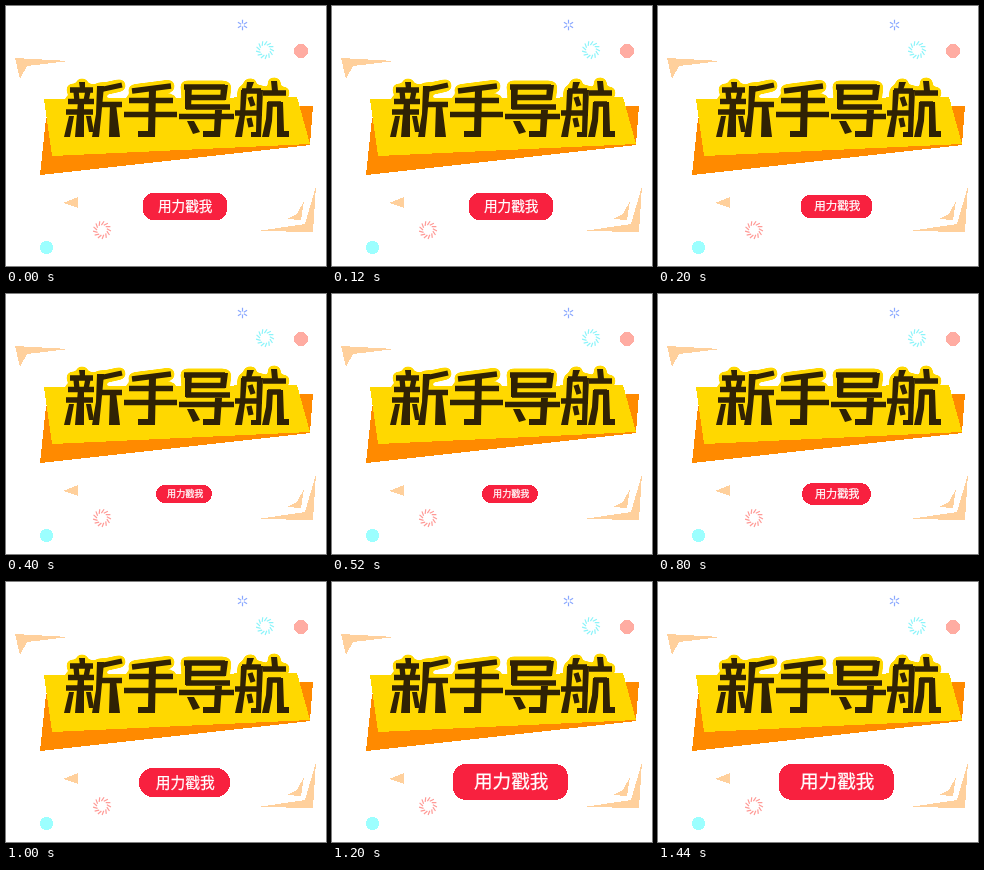
Write an HTML page that moves like this. It is 320 px wide and 260 px high and loops after 1600 ms.

```html
<!DOCTYPE html>
<html lang="zh">
<head>
<meta charset="utf-8">
<title>新手导航</title>
<style>
  html, body { margin: 0; width: 100%; height: 100%; overflow: hidden; background: #fff; }
  svg { display: block; }
  .bar { fill: currentColor; }
  .thin { fill: none; stroke: currentColor; stroke-width: 5.3px; }
  .peach { fill: #ffd09c; }
  .flat { shape-rendering: crispEdges; }
  text {
    font-family: "Noto Sans CJK SC", "Noto Sans CJK", sans-serif; font-weight: 500;
    fill: #fff; stroke: #fff; stroke-width: 0.25px; text-anchor: middle;
  }
</style>
</head>
<body>
<svg width="320" height="260" viewBox="0 0 320 260">
  <defs>
    <!-- Blur and a low threshold give a rounded outline -->
    <filter id="grow" x="-10%" y="-25%" width="120%" height="150%" color-interpolation-filters="sRGB">
      <feGaussianBlur stdDeviation="2.8"/>
      <feComponentTransfer result="shape"><feFuncA type="linear" slope="30" intercept="-1.5"/></feComponentTransfer>
      <feFlood flood-color="#ffd800"/>
      <feComposite operator="in" in2="shape"/>
    </filter>
    <g id="word">
      <!-- 新 -->
      <path class="thin" d="M64 84H87M62 95.5H88M60 106H87M70 85L71 95M82 85L80 95M93 84L116 79M93 98.5H116"/>
      <path class="bar" d="M73 76H79V83H74ZM72 95H78V131H69ZM63 110H68L64 131H58ZM80 110H85L88 126H83Z"/>
      <path class="bar" d="M91 80H98L95 112L93 131H86L90 108ZM104 98H110L114 131H103Z"/>
      <!-- 手 -->
      <path class="thin" d="M126 85L165 80M123 94.5H167M118 108.5H171"/>
      <path class="bar" d="M143 83H150L149 131H132V125H142Z"/>
      <!-- 导 -->
      <path class="thin" d="M178 81H219M181 91.5H219M180 101H224M173 110.5H228"/>
      <path class="bar" d="M179 79H186L185 103H179ZM215 79H222L220 94H214ZM209 104H216L214 131H197V125H208ZM181 115H188L194 126L187 128Z"/>
      <!-- 航 -->
      <path class="thin" d="M236 85H255M229 107H256M257 87H280M244 91L247 100M243 112L245 121M262 98H275"/>
      <path class="bar" d="M241 76H248L245 84H240ZM235 84H241L239 110L236 131H229L234 108ZM251 84H257L255 131H245V126H250Z"/>
      <path class="bar" d="M265 75H271L272 85H266ZM261 96H267L266 115L263 131H256L260 113ZM271 96H277L278 125H283V131H271Z"/>
    </g>
  </defs>

  <g class="flat">
    <path class="peach" d="M9 52L63 55L21 60L14 73Z"/>
    <path class="peach" d="M57 197L72 191V202Z"/>
    <path class="peach" d="M310 180L307 226L252 225L299 218Z"/>
    <path class="peach" d="M298 195L295 214L281 213L291 208Z"/>
    <circle cx="295" cy="45" r="7" fill="#ffaca2"/>
    <circle cx="40.5" cy="241.5" r="6.7" fill="#9cffff"/>
    <path fill="#ff8a00" d="M40 112L34 169L304 139L307 100H290Z"/>
    <path fill="#ffd800" d="M38 93L291 91L304 138L46 150Z"/>
  </g>
  <g id="rays"></g>

  <use href="#word" filter="url(#grow)"/>
  <use href="#word" color="#302204" role="img" aria-label="新手导航"/>

  <rect id="pill" class="flat" fill="#f8213f"/>
  <text id="label" x="179.2">用力戳我</text>
</svg>
<script>
  const $ = id => document.getElementById(id);

  // Ring of ticks; twist slants each one around the centre
  function rays(x, y, n, inner, outer, twist, color) {
    let d = "";
    for (let i = 0; i < n; i++) {
      const a = (i + 0.5) * 2 * Math.PI / n, b = a + twist;
      d += `M${x + inner * Math.cos(a)} ${y + inner * Math.sin(a)}L${x + outer * Math.cos(b)} ${y + outer * Math.sin(b)}`;
    }
    $("rays").innerHTML += `<path d="${d}" stroke="${color}" stroke-width="1.2"/>`;
  }
  rays(236.5, 19, 6, 1.5, 5.3, 0, "#8aa8ff");
  rays(259, 44, 13, 5, 9, 0.35, "#8cf4fa");
  rays(96, 224, 13, 5, 9, 0.35, "#ff9a96");

  // Button poses, 200 ms each: left, top, width, height, corner radius
  const poses = [
    [137, 187, 84, 27, 10], [143, 189, 71, 23, 9], [150, 191, 56, 18, 9], [152, 192, 52, 17, 8.5],
    [144, 189, 69, 22, 11], [133, 186, 91, 29, 14], [121, 182, 115, 36, 13]
  ];

  function set(el, attrs) {
    for (const k in attrs) el.setAttribute(k, attrs[k]);
  }

  function draw(now) {
    const step = Math.floor(now % 1600 / 200);
    const [x, y, w, h, r] = poses[Math.min(step, 6)];
    const size = w * 0.162;
    set($("pill"), { x, y, width: w, height: h, rx: r });
    set($("label"), { y: y + h / 2 + size * 0.34, "font-size": size });
  }

  const start = performance.now();
  function tick() {
    draw(performance.now() - start);
    requestAnimationFrame(tick);
  }
  tick();
</script>
</body>
</html>
```
